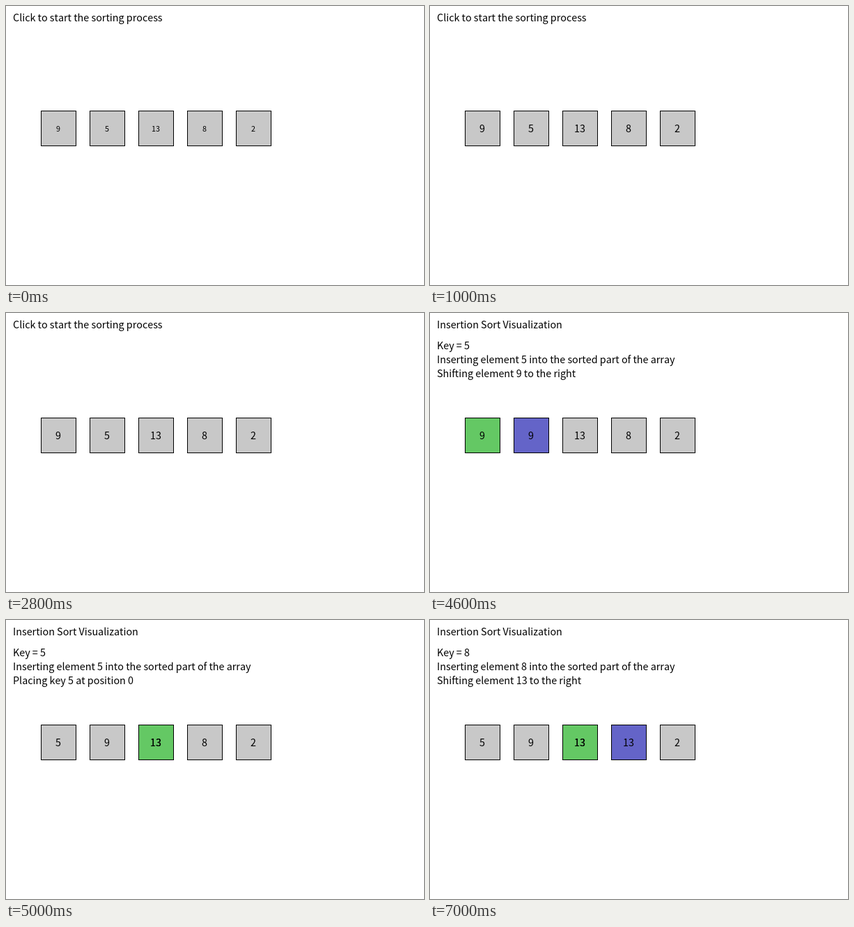
An HTML page that plays this animation: 600x400 px, repeating every 8000 ms.

```html
<!DOCTYPE html>
<html lang="en">
<head>
<meta charset="utf-8">
<title>Insertion Sort Visualization</title>
<style>
  html, body { margin: 0; width: 100%; height: 100%; overflow: hidden; background: #fff; }
  #stage { position: relative; width: 600px; height: 400px; overflow: hidden; }
  #strip { position: absolute; left: 0; top: 0; display: block; animation: steps 8s step-end infinite; }
  text {
    font: 14.33px "Noto Sans CJK SC", "Noto Sans CJK JP", "Noto Sans CJK", sans-serif;
    font-kerning: none;
    fill: #000;
  }
  .num { text-anchor: middle; }
  .small { font-size: 10.75px; }
  rect { stroke: #000; stroke-width: 1; }
  /* each step shows the next 400px scene of the strip */
  @keyframes steps {
    0% { transform: translateY(0); }
    12.5% { transform: translateY(-400px); }
    50% { transform: translateY(-800px); }
    62.5% { transform: translateY(-1200px); }
    75% { transform: translateY(-1600px); }
    87.5%, 100% { transform: translateY(-2000px); }
  }
</style>
</head>
<body>
<div id="stage"><svg id="strip" width="600" height="2400"></svg></div>
<script>
const GRAY = '#c8c8c8', GREEN = '#64c864', BLUE = '#6464c8';
const strip = document.getElementById('strip');

function add(parent, tag, attrs, text) {
  const el = document.createElementNS('http://www.w3.org/2000/svg', tag);
  for (const k in attrs) el.setAttribute(k, attrs[k]);
  if (text !== undefined) el.textContent = text;
  parent.appendChild(el);
  return el;
}

const intro = ['Click to start the sorting process'];
const step = (key, action) => [
  'Insertion Sort Visualization',
  `Key = ${key}`,
  `Inserting element ${key} into the sorted part of the array`,
  action
];

const scenes = [
  { lines: intro, values: [9, 5, 13, 8, 2], small: true },
  { lines: intro, values: [9, 5, 13, 8, 2] },
  { lines: step(5, 'Shifting element 9 to the right'), values: [9, 9, 13, 8, 2], green: 0, blue: 1 },
  { lines: step(5, 'Placing key 5 at position 0'), values: [5, 9, 13, 8, 2], green: 2, bold: true },
  { lines: step(13, 'Placing key 13 at position 2'), values: [5, 9, 13, 8, 2], green: 3, bold: true },
  { lines: step(8, 'Shifting element 13 to the right'), values: [5, 9, 13, 13, 2], green: 2, blue: 3, bold: true }
];

scenes.forEach((scene, n) => {
  const g = add(strip, 'g', { transform: `translate(0 ${n * 400})` });
  scene.lines.forEach((line, i) => add(g, 'text', { x: 10, y: i ? 32 + i * 20 : 22 }, line));
  scene.values.forEach((value, i) => {
    const x = 50 + i * 70;
    const fill = i === scene.green ? GREEN : i === scene.blue ? BLUE : GRAY;
    add(g, 'rect', { x: x + 0.5, y: 150.5, width: 50, height: 50, fill });
    const label = { x: x + 25, y: scene.small ? 180 : 181, class: scene.small ? 'num small' : 'num' };
    add(g, 'text', label, value);
    // a second pass darkens the active label's edges
    if (scene.bold && i === scene.green) add(g, 'text', label, value);
  });
});
</script>
</body>
</html>
```
